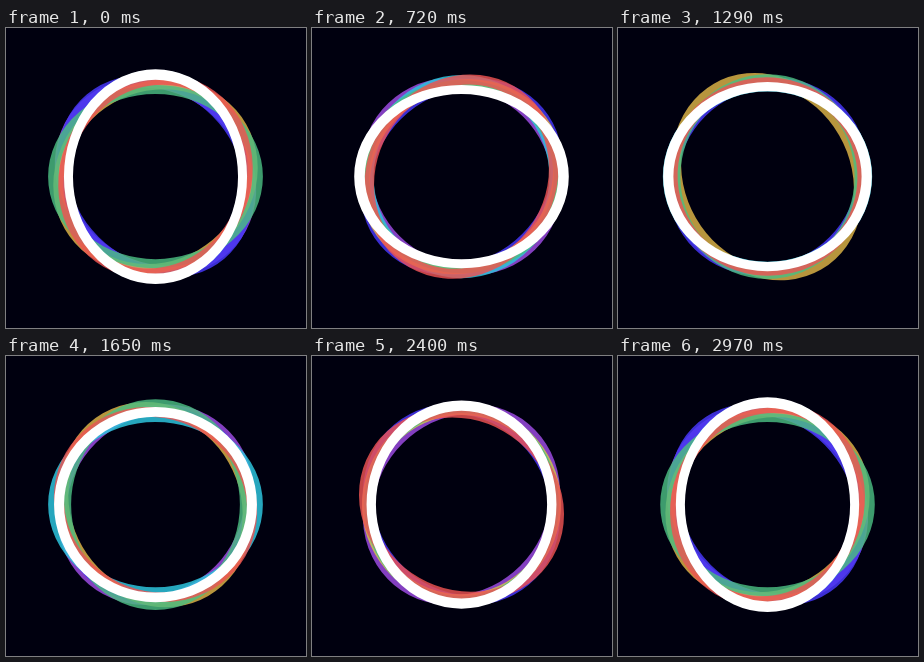
An HTML page with a canvas that plays this animation: 300 by 300 pixels, repeating every 3 s.

```html
<!DOCTYPE html>
<html lang="en">
<head>
<meta charset="utf-8">
<title>Wobbling rings</title>
<style>
  html, body { margin: 0; width: 100%; height: 100%; overflow: hidden; background: #00000f; }
  canvas { display: block; }
</style>
</head>
<body>
<canvas id="stage" width="300" height="300"></canvas>
<script>
const ctx = document.getElementById('stage').getContext('2d');
const LOOP = 3000;
const RADIUS = 94.6;
const WIDTH = 9.8;
const SQUASH = 0.08;

// Back to front: angle in degrees, times in ms of the tallest (peak) and widest (dip) pose
const rings = [
  { color: '#9a4be0', alpha: 0.85, angle: 40, peak: 2200, dip: 150 },
  { color: '#4637f5', alpha: 0.85, angle: 140, peak: 2980, dip: 470 },
  { color: '#2dc3dc', alpha: 0.85, angle: 0, peak: 120, dip: 1635 },
  { color: '#dcb446', alpha: 0.83, angle: 60, peak: 500, dip: 1250 },
  { color: '#4bbe82', alpha: 0.82, angle: 0, peak: 2020, dip: 2990 },
  { color: '#ee5352', alpha: 0.82, angle: 120, peak: 2200, dip: 280 },
  { color: '#ffffff', alpha: 1, angle: 0, peak: 0, dip: 735 }
];

const wrap = t => (t % LOOP + LOOP) % LOOP;

// Halfway between a sine ease and a straight line
const ease = p => (p + (1 - Math.cos(Math.PI * p)) / 2) / 2;

// 1 is tall, -1 is wide
function wobble({ peak, dip }, t) {
  const fall = wrap(dip - peak);
  const since = wrap(t - peak);
  return since < fall
    ? 1 - 2 * ease(since / fall)
    : 2 * ease((since - fall) / (LOOP - fall)) - 1;
}

function drawRing(ring, t) {
  const s = SQUASH * wobble(ring, t);
  ctx.save();
  ctx.translate(149.5, 148.6);
  ctx.rotate(ring.angle * Math.PI / 180);
  ctx.scale(1 - s, 1 + s);
  ctx.globalAlpha = ring.alpha;
  ctx.strokeStyle = ring.color;
  ctx.lineWidth = WIDTH;
  ctx.beginPath();
  ctx.arc(0, 0, RADIUS, 0, Math.PI * 2);
  ctx.stroke();
  ctx.restore();
}

function draw(t) {
  ctx.fillStyle = '#00000f';
  ctx.fillRect(0, 0, 300, 300);
  rings.forEach(ring => drawRing(ring, t));
}

const start = performance.now();
function frame() {
  draw((performance.now() - start) % LOOP);
  requestAnimationFrame(frame);
}
frame();
</script>
</body>
</html>
```
